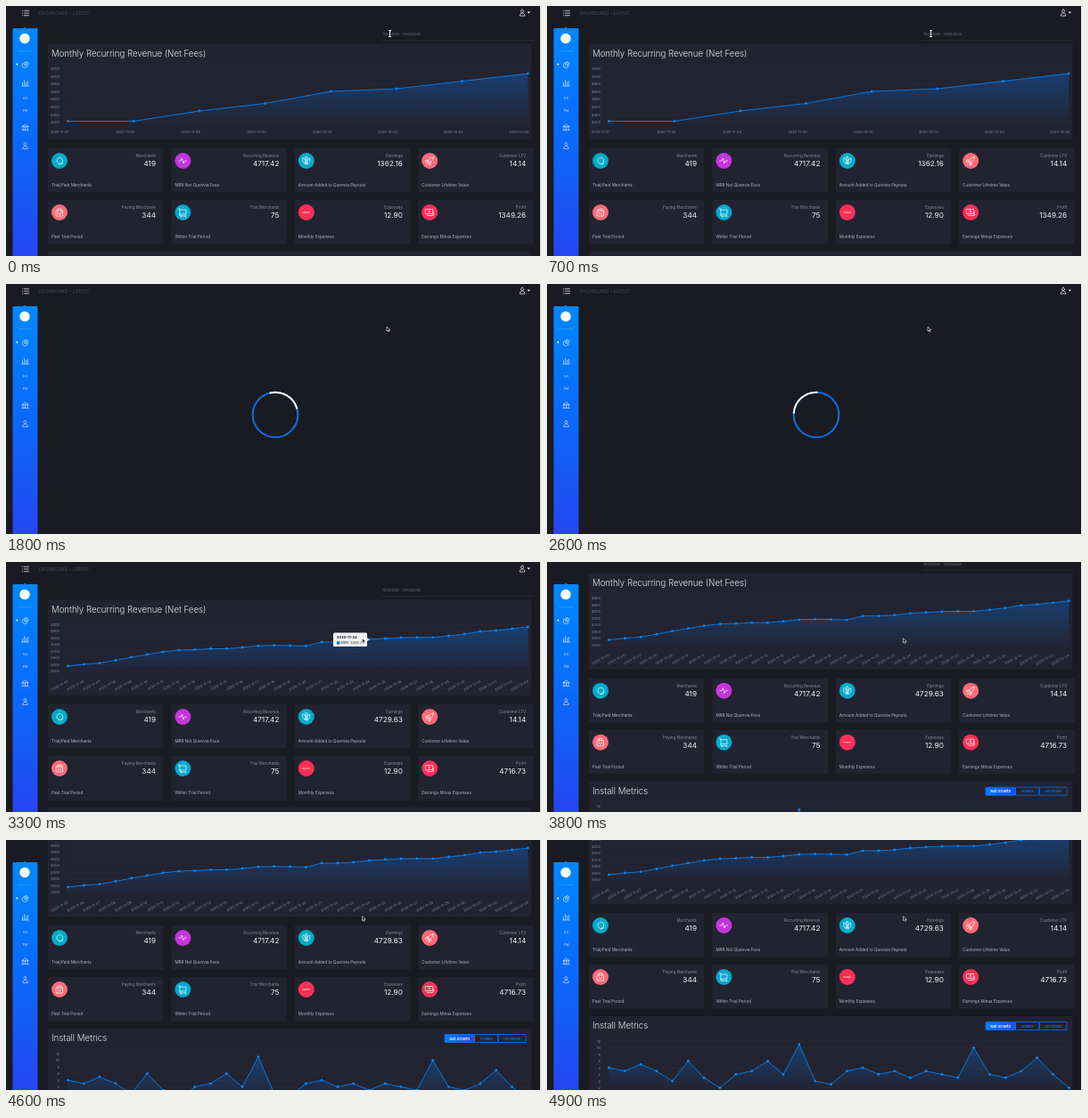
An HTML page for the animation above (5000 ms loop, 600 by 281 pixels).

```html
<!DOCTYPE html>
<html lang="en">
<head>
<meta charset="utf-8">
<title>Revenue dashboard</title>
<style>
html, body { margin: 0; width: 100%; height: 100%; overflow: hidden; background: #1a1b22; }
svg { display: block; width: 100%; height: 100%; font-family: Inter, "Open Sans", sans-serif; }
.line { fill: none; stroke: #0877de; stroke-width: 1; }
.icon { fill: none; stroke: #fff; stroke-width: .7; stroke-linejoin: round; stroke-linecap: round; }
.menu { opacity: .8; }
</style>
</head>
<body>
<svg id="stage" viewBox="0 0 600 281">
  <defs>
    <linearGradient id="side" x2="0" y2="1">
      <stop stop-color="#0088ff"/><stop offset=".5" stop-color="#0a68fb"/><stop offset="1" stop-color="#2546f2"/>
    </linearGradient>
    <linearGradient id="area" x2="0" y2="1">
      <stop stop-color="#0a6de0" stop-opacity=".36"/><stop offset="1" stop-color="#0a6de0" stop-opacity=".02"/>
    </linearGradient>
    <linearGradient id="btn"><stop stop-color="#0a7cff"/><stop offset="1" stop-color="#1a4cf8"/></linearGradient>
  </defs>
</svg>
<script>
const $ = id => document.getElementById(id);
const join = (list, fn) => list.map(fn).join('');
const range = n => [...Array(n).keys()];

const text = (x, y, s, size, fill, more = '') =>
  `<text x="${x}" y="${y}" font-size="${size}" fill="${fill}" ${more}>${s}</text>`;
const rect = (x, y, w, h, fill, more = '') =>
  `<rect x="${x}" y="${y}" width="${w}" height="${h}" fill="${fill}" ${more}/>`;
const circle = (x, y, r, fill) => `<circle cx="${x}" cy="${y}" r="${r}" fill="${fill}"/>`;
const icon = (x, y, d) => `<path class="icon" transform="translate(${x} ${y})" d="${d}"/>`;
const group = (id, s) => `<g id="${id}">${s}</g>`;
const END = 'text-anchor="end"', MID = 'text-anchor="middle"', LIGHT = 'font-weight="300"';
const CARD = '#222330', GREY = '#8b8c99', PALE = '#e4e5ec', BLUE = '#1f86f3';

const PERSON = 'M0-3.4a1.6 1.6 0 1 1-.1 0zM-2.8 3.2c0-4 5.6-4 5.6 0z';
const day = n => new Date(Date.UTC(2020, 10, n)).toISOString().slice(0, 10);

// Line chart with evenly spaced points
const LEFT = 69.5, RIGHT = 585.3;
function chart(ys, base) {
  const xs = ys.map((_, i) => (LEFT + (RIGHT - LEFT) * i / (ys.length - 1)).toFixed(1));
  const d = ys.map((y, i) => xs[i] + ' ' + y).join('L');
  return `<path fill="url(#area)" d="M${d}L${RIGHT} ${base}H${LEFT}z"/><path class="line" d="M${d}"/>` +
    join(ys, (y, i) => circle(xs[i], y, 1.4, '#0a84f2'));
}

// Scale labels from the top down, with faint grid lines
const scale = (top, step, gap, y0) => join(range(8), i => {
  const y = y0 + gap * i;
  return rect(68, y, 518, .4, '#2b2c3a') + text(60, y + 1.5, top - step * i, 4, GREY, END);
});

function weekChart() {
  const ys = [129.5, 129.5, 118, 109.5, 96, 93, 84.5, 76];
  return scale(4750, 50, 8.6, 70.5) + chart(ys, 131) +
    join(ys, (_, i) => text(70.5 + 73.7 * i, 143.3, day(27 + i), 3.9, GREY, END));
}

function monthChart() {
  const ys = [117, 115, 113.7, 110.5, 107, 104, 101, 99, 98.5, 97.5, 97.5, 96, 94.2, 93.7, 94, 94.5,
    90, 90, 89, 87, 86, 85, 84.8, 84.8, 83, 81, 78, 77, 75, 73];
  return scale(4800, 200, 7.5, 70.3) + chart(ys, 123.5) +
    join(ys, (_, i) => text(0, 0, day(5 + i), 3.9, GREY,
      `${END} transform="translate(${70 + 17.8 * i} 135) rotate(-28)"`));
}

function installs() {
  const vals = [4, 3, 5, 3, 0, 6, 1, -2, 2, 3, 6, 2, 11, 0, -1, 3, 4, 2, 3, 1, 3, 2, 1, 10, 2, 1, 3, 7, 2, -2];
  const tabs = [[492, 33.5, 'Net Growth'], [525.5, 26.5, 'Installs'], [552, 31, 'Uninstalls']];
  return rect(47, 276, 542, 110, CARD) + text(51, 290, 'Install Metrics', 9.7, PALE, LIGHT) +
    join(tabs, ([x, w, s], i) =>
      rect(x, 282.5, w, 9, i ? 'none' : 'url(#btn)', 'rx="1" stroke="#0a72f5" stroke-width=".8"') +
      text(x + w / 2, 288.6, s, 4.1, i ? '#2584f2' : '#fff', MID + (i ? '' : ' font-weight="600"'))) +
    scale(12, 2, 7.5, 304) + chart(vals.map(v => 349 - 3.75 * v), 357);
}

const CARDS = [
  ['Merchants', 'Trial/Paid Merchants', '419', '#00abc9', 'M-2 2.5a3.4 3.4 0 1 1 3 .8l-.8 1-.6-1zM1 3.6a2.5 2.5 0 0 0 3-1'],
  ['Recurring Revenue', 'MRR Net Quenvia Fees', '4717.42', '#c436dc', 'M-4.5 0h2l1.5-3 1.5 6 1.5-3h2'],
  ['Earnings', 'Amount Added to Quenvia Payouts', '1362.16', '#00abc9', 'M-4-3v4l3 3v-5zM-1-4v7h2v-7zM1 4l3-3v-4l-3 2z'],
  ['Customer LTV', 'Customer Lifetime Value', '14.14', '#ff6b78', 'M4-4c-4 0-5 3-6 5l1 1c2-1 5-2 5-6zM-2-1h-2l-1 2h2zM1 2v2l-2 1v-2zM-4 4l1.5-1.5'],
  ['Paying Merchants', 'Past Trial Period', '344', '#ff6b78', 'M-3.5-2h7v6h-7zM-2-2v-2h4v2M-2 0c0 2.5 4 2.5 4 0'],
  ['Trial Merchants', 'Within Trial Period', '75', '#00a9cf', 'M-5-4h1.5v8h7M-3.5-3h7v5h-7M-2 4v1M3 4v1'],
  ['Expenses', 'Monthly Expenses', '12.90', '#ff2f56', 'M-4 0h8'],
  ['Profit', 'Earnings Minus Expenses', '1349.26', '#ff2f56', 'M-4.5-3.5h8v5h-8zM-.5-2a1 1 0 1 0 .1 0M-3 3.5h7v-4']
];
const cards = join(CARDS, ([label, foot, value, color, d], i) => {
  const x = 47 + 138.4 * (i % 4), y = i < 4 ? 160 : 218;
  return rect(x, y, 129.5, 49.5, CARD) + circle(x + 13, y + 14, 9, color) + icon(x + 13, y + 14, d) +
    text(x + 121, y + 10.2, label, 4.5, GREY, END) +
    text(x + 121, y + 20, value, 8.2, '#f0f1f6', `${END} class="value"`) +
    text(x + 4, y + 43, foot, 4.6, '#b4b5bf');
});

const header =
  icon(22, 8, 'M-1.5-2.7h5M-1.5 0h5M-1.5 2.7h5M-3.5-2.7h.3M-3.5 0h.3M-3.5 2.7h.3') +
  text(37, 9.7, 'DASHBOARD - LATEST', 5.2, '#4a4b58') +
  icon(579, 7.5, PERSON) + '<path fill="#fff" d="M584.5 6.5h3.4l-1.7 2z"/>';

const dashboard =
  text(422, 33.2, '', 3.7, '#777885', 'id="dates"') + rect(421, 38, 171, .5, '#30313d') +
  rect(47, 42.5, 542, 107.5, CARD) +
  text(51, 56.5, 'Monthly Recurring Revenue (Net Fees)', 9.65, PALE, LIGHT) +
  group('week', weekChart()) + group('month', monthChart()) + cards + installs();

const sidebar = '<path fill="#0a78e0" d="M18.5 25.5l2.5-2 2.5 2z"/>' + rect(7.5, 25, 28, 256, 'url(#side)', 'rx="1"') +
  circle(21, 36.5, 5.7, '#fff') + rect(13, 50, 17, .4, '#5fb0ff') + circle(12.3, 65.5, 1, '#fff') +
  '<g class="menu">' +
  icon(21.5, 66, 'M-.5-2.5a3 3 0 1 0 3.2 3.2h-3.2zM1-3.5a3 3 0 0 1 2.7 2.7h-2.7z') +
  icon(21.5, 86.5, 'M-3 3v-3M-1 3v-6M1 3v-4M3 3v-5M-3.7 3.5h7.4') +
  text(21.5, 105.3, 'AA', 3.8, '#fff', MID) + text(21.5, 119.3, 'FM', 3.8, '#fff', MID) +
  icon(21.5, 136.5, 'M-3.5-1l3.5-2.5 3.5 2.5zM-2.5-1v3.5M0-1v3.5M2.5-1v3.5M-3.7 3h7.4') +
  icon(21.5, 157, PERSON) + '</g>';

// Date picker
const PRESETS = ['Last 7 Days', 'Last 30 Days', 'Last 60 Days', 'This Month', 'Last Month',
  'Last 3 Months', 'Last 6 Months', 'Year to Date', 'Last Year'];
const colX = c => 491 + 15.4 * c, rowY = r => 64 + 12.5 * r;
const pill = (r, a, b, fill) => rect(colX(a) - 7.5, rowY(r) - 4.8, 15.4 * (b - a) + 15, 9.6, fill,
  `rx="4.8" stroke="${BLUE}" stroke-width=".6"`);
const arrow = (x, s) => circle(x, 38, 3.6, '#e9ebf1') + `<path fill="#222" d="M${x + s * 1.4} 38l${-s * 2.4}-1.6v3.2z"/>`;
const caret = x => `<path fill="#444" d="M${x} 37.2h2.6l-1.3 1.6z"/>`;
const picker = rect(401, 25.5, 194, 129.5, '#fff') + rect(401, 0, 77, 13.5, '#eef0f5', 'id="hover"') +
  join(PRESETS, (s, i) => text(407.5, 33.9 + 13.5 * i, s, 4.6, '#1c1d26', 'font-weight="500"')) +
  arrow(488, -1) + arrow(587, 1) + caret(536.5) + caret(566.5) +
  text(521, 39.7, 'November', 4.8, '#222', MID) + text(555, 39.7, '2020', 4.8, '#222', MID) +
  join(['Sun', 'Mon', 'Tue', 'Wed', 'Thu', 'Fri', 'Sat'], (s, c) => text(colX(c), 52.7, s, 3.9, '#777', MID)) +
  group('span', pill(0, 4, 6, 'none') + pill(1, 0, 6, 'none') + pill(2, 0, 6, 'none') + pill(3, 0, 6, 'none')) +
  pill(3, 5, 6, BLUE) + pill(4, 0, 1, BLUE) +
  join(range(30), i => text(colX(i % 7), rowY(i / 7 | 0) + 1.7, i + 1, 4.6, i < 26 ? '#33343c' : '#d5e8ff', MID)) +
  rect(565, 116.5, 7, .7, BLUE);

const tooltip = rect(367, 79.5, 38, 15.5, '#f3f4f6', 'rx="1.5"') + '<path fill="#f3f4f6" d="M405 85.5l2.5 1.8-2.5 1.8z"/>' +
  text(371, 85.5, '2020-11-24', 4, '#15161c', 'font-weight="700"') +
  rect(371, 89.2, 3.4, 3.4, '#0a7fee') + text(375.5, 92.4, 'MRR: 4382.77', 3.9, '#33343c');

const spinner = `<circle cx="302" cy="147" r="25.3" fill="none" stroke="#0f6fe6" stroke-width="2"/>
  <path id="arc" fill="none" stroke="#fff" stroke-width="2" d="M284.11 129.11A25.3 25.3 0 0 1 319.89 129.11"/>`;

const pointer = group('beam', '<path fill="none" stroke="#fff" stroke-width=".9" d="M-1.5-3.5h3M0-3.5v7M-1.5 3.5h3"/>') +
  group('hand', '<path fill="#fff" stroke="#111" stroke-width=".7" d="M-1 0V-3q.7-1 1.4 0v2l2.2.6q.7.3.4 1.4l-.6 2.5h-3l-2-2.6q.2-1 1.6-.2z"/>') +
  group('arrow', '<path fill="#111" stroke="#fff" stroke-width=".6" d="M-1-2.5v5l1.2-1 .8 1.7 1-.5-.8-1.6h1.6z"/>');

$('stage').innerHTML += rect(0, 0, 600, 281, '#1a1b22') +
  group('page', header + group('board', dashboard)) + sidebar + rect(599, 0, 1, 281, '#f4f4f6') +
  group('spinner', spinner) + group('picker', picker) + group('tip', tooltip) + group('pointer', pointer);

const values = document.querySelectorAll('.value');
const show = (id, on) => $(id).style.display = on ? '' : 'none';
const ease = (t, from, length) => 1 - (1 - Math.min(1, Math.max(0, (t - from) / length))) ** 3;

const OPEN = 800, PICK = 1400, LOADED = 2650, HOVER = 3050, SCROLL = 3620, SCROLL_2 = 4500;

function frame() {
  const t = performance.now() % 5000;
  const open = t >= OPEN && t < PICK, loading = t >= PICK && t < LOADED, month = t >= LOADED;
  const down = ease(t, OPEN, 250), over = ease(t, LOADED, HOVER - LOADED);
  const x = 430.5 - 2.5 * down - 27.5 * over, y = 31 + 19.5 * down + 37.7 * over;
  const row = Math.floor((y - 25.5) / 13.5);
  const scroll = 30 * ease(t, SCROLL, 250) + 48 * ease(t, SCROLL_2, 300);

  show('board', !loading);
  show('spinner', loading);
  show('picker', open);
  show('week', !month);
  show('month', month);
  show('tip', t >= HOVER && t < SCROLL);
  show('span', row === 1);
  show('beam', t < OPEN);
  show('hand', open);
  show('arrow', t >= PICK);

  $('dates').textContent = (month ? '11/05/2020' : '11/27/2020') + ' - 12/04/2020';
  values[2].textContent = month ? '4729.63' : '1362.16';
  values[7].textContent = month ? '4716.73' : '1349.26';
  $('hover').setAttribute('y', 25.5 + 13.5 * row);
  $('page').setAttribute('transform', `translate(0 ${-scroll})`);
  $('arc').setAttribute('transform', `rotate(${30 + .36 * (t - 1800)} 302 147)`);
  $('pointer').setAttribute('transform', `translate(${x} ${y})`);
  requestAnimationFrame(frame);
}
frame();
</script>
</body>
</html>
```
